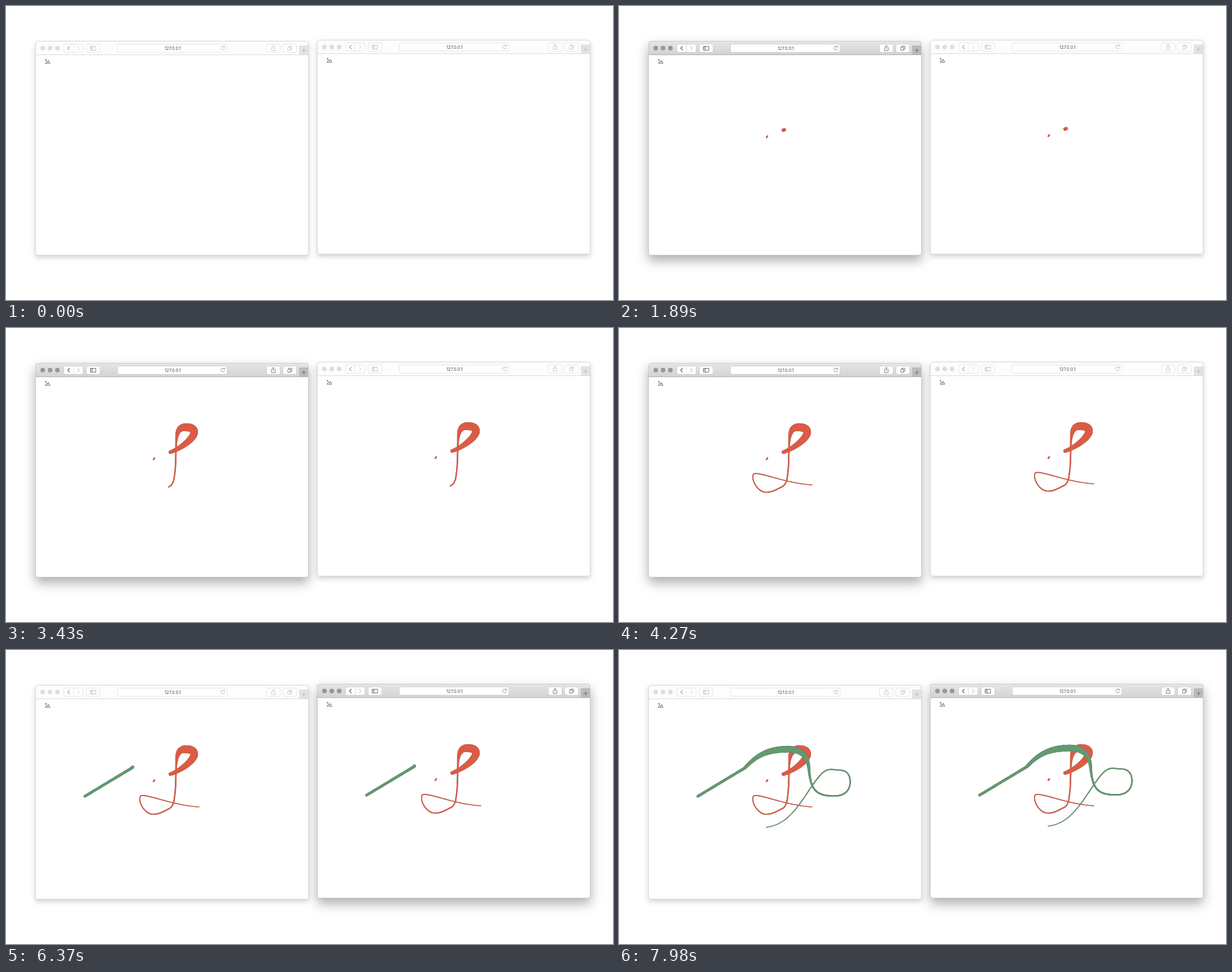
An HTML page that plays this animation: 1075x521 px, repeating every 8 s.

```html
<!DOCTYPE html>
<html lang="en">
<head>
<meta charset="utf-8">
<title>Shared drawing</title>
<style>
  html, body { margin: 0; width: 100%; height: 100%; overflow: hidden; background: #fff; }
  svg { display: block; }
  text { font-family: Inter, "Liberation Sans", sans-serif; font-size: 7.5px; text-anchor: middle; fill: #444; }
</style>
</head>
<body>
<svg id="stage" width="1075" height="521" viewBox="0 0 1075 521">
  <defs>
    <filter id="deep" x="-10%" y="-10%" width="120%" height="120%"><feGaussianBlur stdDeviation="10"/></filter>
    <filter id="soft" x="-10%" y="-10%" width="120%" height="120%"><feGaussianBlur stdDeviation="5"/></filter>
    <linearGradient id="bar" x2="0" y2="1">
      <stop stop-color="#e6e6e6"/><stop offset="1" stop-color="#d2d2d2"/>
    </linearGradient>
    <g id="ink" fill="none" stroke-linecap="round"></g>
  </defs>
  <rect width="1075" height="521" fill="#ccc"/>
  <rect width="1075" height="521" rx="1.5" fill="#fff"/>
</svg>
<script>
const LOOP = 8000, STEP = 70;
const LEFT_FOCUS = 490, RIGHT_FOCUS = 4970;
const RED = { fill: '#db5c45', edge: '#b3665a' };
const GREEN = { fill: '#629a71', edge: '#648069' };

// Pen pressure: a lopsided bell around `peak` px along the stroke, on a line thinning to its end.
const bell = (gain, peak, rise, fall) => s => gain * Math.exp(-(((s - peak) / (s < peak ? rise : fall)) ** 2));
const flat = () => 0;

// `from` and `to` are steps; `pace` is the steady share of the speed, the rest speeds up late.
const strokes = [
  { color: RED, from: 15, to: 16, pace: 1, thick: 2.8, thin: 2.6, press: flat,
    d: 'M261.3 233L263 230.5' },
  { color: RED, from: 27, to: 61, pace: 0.78, thick: 3.2, thin: 1.4, press: bell(11.3, 72, 62, 24),
    d: `M291 220C304 216 329 200 333 187C335 178 326 176 320 176C306 174 303 186 302 197
        C300 215 302 240 298 264C297 276 291 281 287 282C278 287 270 291 262 291
        C248 292 237 275 237 264C237 257 240 257.5 247 258.3C262 261 272 265 297 271
        C314 275 330 277.5 342 278` },
  { color: GREEN, from: 90, to: 91, pace: 1, thick: 4.6, thin: 4.8, press: flat,
    d: 'M139.5 259.3L223 209' },
  { color: GREEN, from: 91, to: 114, pace: 0.94, thick: 4, thin: 1.3, press: bell(8.2, 85, 66, 46),
    d: `M223 209C246 184 266 176 300 175.7C322 176 334 188 336 208C339 240 343 258.5 378 258.5
        C398 260 409 250 409.5 234C409 214 397 212.5 385 212.6C368 210 363 211 343 239
        C317 278 298 310 261 314` }
];

const NS = 'http://www.w3.org/2000/svg';
const stage = document.getElementById('stage');
const ink = document.getElementById('ink');

function add(parent, tag, attrs = {}) {
  const el = document.createElementNS(NS, tag);
  for (const name in attrs) el.setAttribute(name, attrs[name]);
  return parent.appendChild(el);
}

const show = (el, on) => { el.style.display = on ? '' : 'none'; };

function buildStroke(stroke) {
  const guide = add(ink, 'path', { d: stroke.d });
  const edge = add(ink, 'g', { stroke: stroke.color.edge });
  const fill = add(ink, 'g', { stroke: stroke.color.fill });
  const length = guide.getTotalLength();
  const count = Math.ceil(length / 2);
  stroke.marks = [];
  for (let i = 0; i < count; i++) {
    const a = guide.getPointAtLength(length * i / count);
    const b = guide.getPointAtLength(length * (i + 1) / count);
    const share = i / count;
    const width = stroke.thick + (stroke.thin - stroke.thick) * share + stroke.press(length * share);
    for (const [layer, grow] of [[edge, 0.1], [fill, -0.9]]) {
      const el = add(layer, 'line', { x1: a.x, y1: a.y, x2: b.x, y2: b.y, 'stroke-width': width + grow });
      stroke.marks.push({ el, share });
    }
  }
  guide.remove();
}

function drawStroke({ from, to, pace, marks }, step) {
  const u = Math.min(1, (step - from) / (to - from));
  const drawn = u < 0 ? -1 : pace * u + (1 - pace) * u ** 6;
  for (const { el, share } of marks) show(el, share <= drawn);
}

function buildShadow(x, y, active) {
  return add(stage, 'rect', {
    x, y: y + (active ? 9.5 : 4), width: 484, height: 380, rx: 4,
    'fill-opacity': active ? 0.32 : 0.18, filter: active ? 'url(#deep)' : 'url(#soft)'
  });
}

function buildChrome(x, y, active) {
  const tone = (on, off) => active ? on : off;
  const g = add(stage, 'g', { transform: `translate(${x} ${y})`, fill: 'none' });
  const path = (d, stroke, width = 0.9) => add(g, 'path', { d, stroke, 'stroke-width': width });
  const frame = attrs => add(g, 'rect', { x: 0.5, y: 0.5, width: 483, height: 379, rx: 4, ...attrs });
  const button = (left, width) => add(g, 'rect', {
    x: left, y: 5.5, width, height: 14.5, rx: 2.5,
    fill: '#fff', stroke: tone('#cbcbcb', '#dedede'), 'stroke-width': 0.8
  });
  const glyph = tone('#555', '#b8b8b8');

  frame({ fill: '#fff' });
  path('M.5 24.5V4.5a4 4 0 0 1 4-4h475a4 4 0 0 1 4 4v20z', 'none')
    .setAttribute('fill', tone('url(#bar)', '#fdfdfd'));
  add(g, 'rect', { x: 467, y: 8, width: 16.5, height: 16.5, fill: tone('#bbb', '#e3e3e3') });
  path('M0 24.5H484', tone('#b0b0b0', '#d9d9d9'), 1);
  frame({ stroke: tone('#c8c8c8', '#d4d4d4'), 'stroke-width': 0.9 });

  for (const cx of [13, 26, 39]) add(g, 'circle', { cx, cy: 12.7, r: 4.1, fill: tone('#989898', '#dedede') });
  button(50.5, 34);
  path('M67.5 5.5V20', tone('#d2d2d2', '#e2e2e2'), 0.8);
  path('M60.8 9.2L57.3 12.8L60.8 16.4', tone('#444', '#999'), 1.1);
  path('M74.3 9.2L77.8 12.8L74.3 16.4', tone('#aaa', '#ccc'), 1);
  button(90.5, 24);
  path('M97.5 9.5h9.5v6.8h-9.5zM100.7 9.5v6.8M98.5 11.2h1.3M98.5 13h1.3', glyph);
  button(145.5, 194);
  path('M335 10.8A3.4 3.4 0 1 0 335.3 13.5M335.2 8.4V11h-2.7', tone('#777', '#aaa'), 0.8);
  button(409.5, 24);
  path('M419.7 11.3H418.2V17h6.6V11.3H423.3M421.5 14V8M419.5 9.8L421.5 7.8L423.5 9.8', glyph, 0.8);
  button(438.5, 24);
  path('M447 11h5v5.5h-5zM449 11V9.2h5.2v5.2H452', glyph, 0.8);
  path('M475.5 13.2v7.4M471.8 16.9h7.4', tone('#666', '#b4b4b4'), 0.9);
  add(g, 'text', { x: 243.3, y: 16 }).textContent = '127.0.0.1';

  path('M17.6 39.7L20.3 35.5L21.8 38L23.4 34.5L25.9 39.7ZM18.6 32v2.8M17.2 33.4H20', '#555', 0.9);
  return g;
}

const places = [[52, 62], [551, 60]];
const eachState = build => places.map(([x, y]) => [false, true].map(active => build(x, y, active)));
const layers = [eachState(buildShadow), eachState(buildChrome)];
strokes.forEach(buildStroke);
add(stage, 'use', { href: '#ink' });
add(stage, 'use', { href: '#ink', x: 499, y: -2 });

const start = performance.now();
let shown = -1;

function render(ms) {
  const step = Math.floor(ms / STEP);
  if (step === shown) return;
  shown = step;
  const focus = ms >= RIGHT_FOCUS ? 1 : ms >= LEFT_FOCUS ? 0 : -1;
  for (const layer of layers) {
    layer.forEach(([idle, active], i) => {
      show(idle, i !== focus);
      show(active, i === focus);
    });
  }
  for (const stroke of strokes) drawStroke(stroke, step);
}

function tick() {
  render((performance.now() - start) % LOOP);
  requestAnimationFrame(tick);
}
tick();
</script>
</body>
</html>
```
